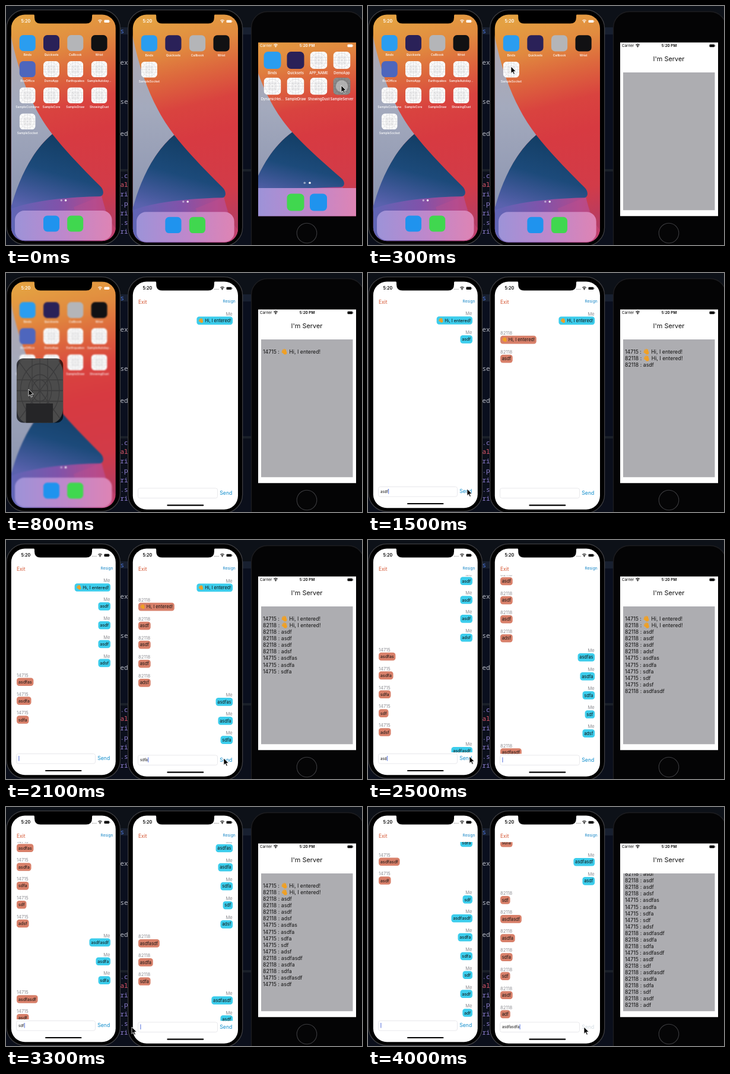
These frames come from a looping animation (600 px wide and 403 px high, 4.1 s). An HTML page:

```html
<!DOCTYPE html>
<html lang="en">
<head>
<meta charset="utf-8">
<title>Socket chat demo</title>
<style>
  html, body { margin: 0; width: 600px; height: 403px; overflow: hidden; background: #0a0f1e; }
  svg { display: block; }
  text { font-family: Inter, "Open Sans", sans-serif; white-space: pre; }
  .code { font-family: "Noto Sans Mono", "DejaVu Sans Mono", monospace; }
</style>
</head>
<body>
<svg id="stage" width="600" height="403" viewBox="0 0 600 403">
  <defs>
    <linearGradient id="sky" x1=".4" y1="0" x2=".52" y2="1">
      <stop offset="0" stop-color="#e4a142"/><stop offset=".15" stop-color="#e18a3f"/>
      <stop offset=".27" stop-color="#dd683d"/><stop offset=".41" stop-color="#d9433f"/>
      <stop offset=".55" stop-color="#d73a41"/><stop offset=".8" stop-color="#d23b48"/><stop offset="1" stop-color="#b03c68"/>
    </linearGradient>
    <linearGradient id="mist" x1="0" y1="0" x2="0" y2="1">
      <stop offset="0" stop-color="#b0a9b0"/><stop offset=".4" stop-color="#a4aabd"/><stop offset="1" stop-color="#8b94b0"/>
    </linearGradient>
    <linearGradient id="sea" x1=".6" y1="0" x2=".25" y2="1">
      <stop offset="0" stop-color="#123c62"/><stop offset=".5" stop-color="#1c4a7a"/><stop offset="1" stop-color="#5a62ae"/>
    </linearGradient>
    <linearGradient id="dusk">
      <stop offset="0" stop-color="#5f66b6"/><stop offset=".45" stop-color="#8053aa"/><stop offset=".8" stop-color="#b04a8c"/><stop offset="1" stop-color="#c43f68"/>
    </linearGradient>
    <linearGradient id="dock">
      <stop offset="0" stop-color="#9d93d8"/><stop offset=".5" stop-color="#bd88cc"/><stop offset="1" stop-color="#de84b4"/>
    </linearGradient>
    <g id="wall">
      <rect x="-1" width="178" height="384" fill="url(#sky)"/>
      <path d="M-1 34C14 110 40 165 69 202C33 232 10 284 -1 334Z" fill="url(#mist)"/>
      <path d="M-1 322C40 312 100 308 152 305C158 330 165 350 177 362V384H-1Z" fill="url(#dusk)"/>
      <path d="M105 325L152 306 172 382H122Z" fill="#c2508e" opacity=".3"/>
      <path d="M69 202C95 235 125 265 150 290C157 297 156 306 150 307C100 308 40 313 -1 328C10 284 33 232 69 202Z" fill="url(#sea)"/>
    </g>
    <symbol id="grid" viewBox="0 0 30 30" preserveAspectRatio="none">
      <rect width="30" height="30" rx="7" fill="#fbfbfb"/>
      <g fill="none" stroke="#c6c6c9" stroke-width=".45">
        <path d="M2 2L28 28M28 2L2 28M0 15H30M15 0V30M10 0V30M20 0V30M0 10H30M0 20H30"/>
        <circle cx="15" cy="15" r="5"/><circle cx="15" cy="15" r="7.5"/><circle cx="15" cy="15" r="12.5"/>
      </g>
    </symbol>
    <symbol id="hand" viewBox="0 0 10 10">
      <path d="M4.4 6.4L2 3.6M5 5.4L3.2 2M6.2 5L5 1.4M7.3 5L6.8 2.1M4 7L1.5 5.5" stroke="#f0a024" stroke-width="1.4" stroke-linecap="round"/>
      <circle cx="6.1" cy="6.6" r="2.6" fill="#f0a024"/>
    </symbol>
    <clipPath id="screen"><rect x="8.8" y="14.4" width="176" height="381.8" rx="23"/></clipPath>
    <clipPath id="list"><rect x="8" y="59" width="178" height="299"/></clipPath>
    <clipPath id="small"><rect x="425" y="61.6" width="165" height="292.6"/></clipPath>
    <clipPath id="log"><rect x="430" y="112" width="155" height="232"/></clipPath>
  </defs>
</svg>
<script>
const LOOP = 4100, STEP = 100;
const A = '14715', B = '82118', HI = 'Hi, I entered!';

// [time, sender, text]
const chat = [
  [720, A, HI], [1090, B, HI], [1490, B, 'asdf'], [1590, B, 'asdf'], [1690, B, 'asdf'], [1790, B, 'adsf'],
  [1940, A, 'asdfas'], [2020, A, 'asdfa'], [2100, A, 'sdfa'], [2180, A, 'sdf'], [2260, A, 'adsf'],
  [2405, B, 'asdfasdf'], [2540, B, 'asdfa'], [2700, B, 'sdfa'], [3000, A, 'asdfasdf'], [3205, A, 'asdf'],
  [3330, B, 'sdf'], [3420, B, 'asdfasdf'], [3490, B, 'asdfa'], [3560, B, 'sdfa'], [3640, B, 'sdf'],
  [3710, B, 'asdf'], [3790, B, 'adf'], [4010, A, 'asdfasdfa']
].map(([at, who, text]) => ({ at, who, text }));

// pointer tip: [time, x, y]
const path = [
  [0, 565, 134], [150, 565, 134], [300, 241, 102], [500, 241, 102], [720, 38, 196], [900, 38, 196],
  [1150, 60, 368], [1280, 60, 368], [1480, 167, 364], [1800, 168, 364], [1930, 366, 368],
  [2280, 368, 368], [2400, 171, 365], [2700, 171, 365], [2950, 372, 368], [3200, 372, 368],
  [3300, 212, 371], [3350, 170, 365], [3790, 170, 365], [3900, 290, 371], [4000, 364, 371], [4100, 364, 371]
];

const clamp = x => Math.max(0, Math.min(1, x));
const mix = (a, b, k) => a + (b - a) * k;
const smooth = x => x * x * (3 - 2 * x);
const easeOut = x => 1 - (1 - x) ** 2;

function set(node, attrs) {
  for (const k in attrs) node.setAttribute(k, attrs[k]);
  return node;
}
function el(parent, tag, attrs) {
  return parent.appendChild(set(document.createElementNS('http://www.w3.org/2000/svg', tag), attrs || {}));
}
const box = (p, x, y, width, height, rx, fill, more) => el(p, 'rect', { x, y, width, height, rx, fill, ...more });
// y is the middle of the line
function label(p, str, x, y, size, fill, more) {
  const node = el(p, 'text', { x, y: y + size * .36, 'font-size': size, fill, ...more });
  node.textContent = str;
  return node;
}
const END = { 'text-anchor': 'end' }, MID = { 'text-anchor': 'middle' };
const show = (node, on) => set(node, { visibility: on ? 'inherit' : 'hidden' });

function tile(p, cx, cy, s, color) {
  const x = cx - s / 2, y = cy - s / 2;
  return color ? box(p, x, y, s, s, s * .24, color)
    : el(p, 'use', { href: '#grid', x, y, width: s, height: s });
}

const COLORS = { Binds: '#2a9df0', Quicksets: '#2a2158', Callbook: '#b4b5b8', Wrist: '#111113', BoxOffice: '#4e66bd' };
const STOCK = ['Binds', 'Quicksets', 'Callbook', 'Wrist'];

function icons(p, names, x0, y0, dx, dy, s, size) {
  return names.map((name, i) => {
    const cx = x0 + i % 4 * dx, cy = y0 + Math.floor(i / 4) * dy;
    label(p, name, cx, cy + s * .73, size, '#fff', { ...MID, 'font-weight': 500 });
    return tile(p, cx, cy, s, COLORS[name]);
  });
}

function wifi(p, x, y) {
  el(p, 'path', { d: `M${x - 3.2} ${y - 1.2}Q${x} ${y - 4} ${x + 3.2} ${y - 1.2}M${x - 1.9} ${y + .3}Q${x} ${y - 1.4} ${x + 1.9} ${y + .3}`,
    fill: 'none', stroke: 'currentColor', 'stroke-width': 1.1 });
  el(p, 'circle', { cx: x, cy: y + 1.6, r: 1, fill: 'currentColor' });
}
function battery(p, x, y) {
  box(p, x, y - 2.2, 8.6, 4.4, 1.2, 'currentColor');
  box(p, x + 9.1, y - .8, .8, 1.6, .4, 'currentColor');
}

// Window that grows out of a pressed icon until it fills the screen
function launcher(p, icon, from, to, start) {
  const g = el(p, 'g');
  const art = el(g, 'use', { href: '#grid' });
  const dim = box(g, 0, 0, 0, 0, 0, '#000');
  const block = box(g, 0, 0, 0, 0, 0, '#252527');
  const white = box(g, 0, 0, 0, 0, 0, '#fff');
  const touch = el(g, 'circle', { cx: from.x, cy: from.y, r: 10, fill: '#d8d8d8', opacity: .55 });
  return t => {
    const k = smooth(clamp((t - start) / 290)), active = t > start - STEP && k < 1;
    show(g, active);
    show(icon, !active && k < 1);
    show(touch, active && k === 0);
    const w = mix(from.s, to.w, k), h = mix(from.s, to.h, k ** 1.39);
    const x = mix(from.x, to.x + to.w / 2, k) - w / 2, y = mix(from.y, to.y + to.h / 2, k) - h / 2;
    const area = { x, y, width: w, height: h, rx: mix(6.5, 20, k) };
    set(art, area);
    set(dim, { ...area, opacity: .45 + .25 * clamp(k * 3) });
    set(block, { x: x + w * .2, y: y + h * .7, width: w * .58, height: h * .3, opacity: clamp(k * 5) });
    set(white, { ...area, opacity: clamp((k - .4) * 2.4) });
    return k;
  };
}

// Space scrolled so that the newest row rests on the limit
function scrollAt(rows, t, base, pitch, limit) {
  return rows.reduce((sum, m, i) =>
    sum + Math.min(pitch, Math.max(0, base + pitch * i - limit)) * easeOut(clamp((t - m.at) / 200)), 0);
}

function fieldText(user, t) {
  const own = chat.filter(m => m.who === user);
  const i = own.findIndex((m, n) => n > 0 && t < m.at + 50);
  if (i < 0) return '';
  const m = own[i], from = Math.max(own[i - 1].at + 50, m.at - 200);
  return m.text.slice(0, Math.ceil(m.text.length * clamp((t - from) / (m.at - from))));
}

function bubble(p, m, mine) {
  const g = el(p, 'g'), hi = m.text === HI, pad = hi ? 11 : 0;
  label(g, mine ? 'Me' : m.who, mine ? 175.5 : 18, -11.3, 7.5, '#8e8e93', mine ? END : {});
  const back = box(g, 0, -6.8, 0, 13.6, 4.2, mine ? '#3ccdec' : '#d8806a');
  const text = label(g, m.text, 0, 0, 7.3, '#111');
  const w = text.getComputedTextLength() + pad + 5.4, x = mine ? 176 - w : 18;
  set(back, { x, width: w });
  set(text, { x: x + 2.7 + pad });
  if (hi) el(g, 'use', { href: '#hand', x: x + 2.5, y: -5, width: 9.5, height: 9.5 });
  return g;
}

function tallPhone(p, user, names, openAt, focusAt, transform) {
  const g = el(p, 'g', { transform });
  box(g, .8, 6.6, 191.6, 395.4, 31, '#000', { stroke: '#3d3d40', 'stroke-width': 1.3 });
  const screen = el(g, 'g', { 'clip-path': 'url(#screen)' });

  const home = el(screen, 'g');
  el(home, 'use', { href: '#wall', transform: 'translate(9 14)' });
  const apps = icons(home, names, 36.2, 62.5, 40.3, 44.1, 27, 5.1);
  el(home, 'circle', { cx: 93.3, cy: 327.7, r: 1.7, fill: '#fff', opacity: .5 });
  el(home, 'circle', { cx: 100.6, cy: 327.7, r: 1.7, fill: '#fff' });
  box(home, 15, 345, 163.5, 50, 16, 'url(#dock)');
  tile(home, 76.5, 367, 27, '#1f93ee');
  tile(home, 116.7, 367, 27, '#40d74f');
  const n = names.length - 1;
  const open = launcher(screen, apps[n], { x: 36.2 + n % 4 * 40.3, y: 62.5 + Math.floor(n / 4) * 44.1, s: 27 },
    { x: 9, y: 14, w: 175, h: 382 }, openAt);

  const app = el(screen, 'g');
  box(app, 8, 14, 178, 383, 0, '#fff');
  label(app, 'Exit', 18, 49, 8.4, '#d4532f');
  label(app, 'Resign', 180.5, 47.7, 6.6, '#1485c6', END);
  const list = el(app, 'g', { 'clip-path': 'url(#list)' });
  const rows = chat.filter(m => user === A || m !== chat[0]).slice(0, -1);
  const views = rows.map(m => bubble(list, m, m.who === user));
  box(app, 17.5, 360.5, 133, 16.5, 3, '#fff', { stroke: '#e3e3e7', 'stroke-width': .8 });
  const field = label(app, '', 21, 368.4, 6.2, '#111');
  const caret = box(app, 21, 364, .9, 8.5, 0, '#3f5fd8');
  const send = label(app, 'Send', 154.3, 368.3, 8.6, '#0d8ccc');
  box(app, 66, 388, 61.5, 2.1, 1, '#000');

  el(g, 'path', { d: 'M44 13H149q-4 0-4 4v2.4q0 10-10 10H58q-10 0-10-10v-2.4q0-4-4-4Z', fill: '#000' });
  const status = el(g, 'g');
  label(status, '5:20', 25.4, 25.8, 7.1, 'currentColor', { 'font-weight': 600 });
  wifi(status, 158.5, 25.8);
  battery(status, 165.5, 25.8);
  const signal = el(status, 'g');
  for (let i = 0; i < 4; i++) el(signal, 'circle', { cx: 145.5 + i * 2.2, cy: 27.3, r: .6, fill: '#777' });

  return t => {
    const k = open(t);
    home.style.filter = k > 0 && k < 1 ? `blur(${Math.min(1, k * 3)}px)` : '';
    show(home, k < 1);
    show(app, k === 1);
    show(signal, k === 1);
    set(status, { color: k > .8 ? '#000' : '#fff' });
    const shift = scrollAt(rows, t, 80, 31.85, 347);
    views.forEach((v, i) => {
      show(v, t >= rows[i].at);
      set(v, { transform: `translate(0 ${80 + 31.85 * i - shift})` });
    });
    field.textContent = fieldText(user, t);
    set(caret, { x: 21.4 + field.getComputedTextLength() });
    show(caret, t >= focusAt);
    set(send, { fill: user === A && t >= 4000 ? '#d3dce2' : '#0d8ccc' });
  };
}

function serverPhone(p) {
  box(p, 413.5, 9.5, 190, 420, 27, '#040405', { stroke: '#1d1d20', 'stroke-width': 1.4 });
  el(p, 'circle', { cx: 507, cy: 383, r: 16.8, fill: '#050506', stroke: '#3c3c3f', 'stroke-width': 1.1 });
  const screen = el(p, 'g', { 'clip-path': 'url(#small)' });

  const home = el(screen, 'g');
  el(home, 'use', { href: '#wall', transform: 'translate(412 35) scale(1.02 .88)' });
  const names = ['Binds', 'Quicksets', 'APP_NAME', 'DemoApp', 'DynamicHei...', 'SampleDraw', 'ShowingDust', 'SampleServer'];
  const apps = icons(home, names, 449, 91.5, 39, 43.8, 29, 5.8);
  el(home, 'circle', { cx: 503.3, cy: 298.2, r: 1.8, fill: '#fff', opacity: .5 });
  el(home, 'circle', { cx: 512, cy: 298.2, r: 1.8, fill: '#fff' });
  box(home, 425, 307, 165, 48, 0, 'url(#dock)');
  tile(home, 488, 331, 29, '#40d74f');
  tile(home, 526.5, 331, 29, '#1f93ee');
  const open = launcher(screen, apps[7], { x: 566, y: 135.3, s: 29 }, { x: 425, y: 61, w: 165, h: 293 }, 0);

  const app = el(screen, 'g');
  box(app, 425, 61, 165, 294, 0, '#fff');
  label(app, "I'm Server", 507, 89, 10.9, '#111', MID);
  box(app, 430, 112, 154.5, 232.3, 0, '#adadb1');
  const log = el(el(app, 'g', { 'clip-path': 'url(#log)' }), 'g');
  const rows = chat.slice(0, -1);
  const lines = rows.map((m, i) => {
    const g = el(log, 'g'), y = 133 + 11.05 * i, hi = m.text === HI;
    const head = label(g, m.who + ' : ' + (hi ? '' : m.text), 433, y, 8.75, '#111');
    if (hi) {
      const x = 433 + head.getComputedTextLength();
      el(g, 'use', { href: '#hand', x, y: y - 6, width: 11.5, height: 11.5 });
      label(g, HI, x + 14, y, 8.75, '#111');
    }
    return g;
  });

  const status = el(p, 'g');
  label(status, 'Carrier', 428, 67, 6.2, 'currentColor');
  wifi(status, 454.5, 67);
  label(status, '5:20 PM', 507.5, 67, 6.3, 'currentColor', { ...MID, 'font-weight': 600 });
  battery(status, 575.5, 67);

  return t => {
    const k = open(t);
    home.style.filter = k > 0 && k < 1 ? `blur(${Math.min(1, k * 3)}px)` : '';
    show(home, k < 1);
    show(app, k === 1);
    set(status, { color: k > .8 ? '#000' : '#fff' });
    lines.forEach((g, i) => show(g, t >= rows[i].at));
    set(log, { transform: `translate(0 ${-scrollAt(rows, t, 133, 11.05, 334.1)})` });
  };
}

function editor(p) {
  box(p, 0, 0, 600, 403, 0, '#0a0f1e');
  box(p, 0, 0, 600, 36, 0, '#0d1118');
  box(p, 0, 36, 600, 12, 0, '#182030');
  box(p, 0, 275, 600, 4, 0, '#1a2029');
  box(p, 0, 279, 600, 124, 0, '#0b0f1b');
  const code = [['s', 42, '#4a74d8'], ['ex', 95, '#b8bbc4'], ['se', 161, '#b8bbc4'], ['ed', 215, '#b8bbc4'],
    ['.c', 286, '#8f7fd0'], ['al', 301, '#e0586a'], ['ri', 317, '#8f7fd0'], ['.p', 333, '#8f7fd0'],
    ['ri', 349, '#8f7fd0'], ['.s', 365, '#8f7fd0'], ['ri', 380, '#8f7fd0']];
  for (const [str, y, fill] of code) label(p, str, 192.5, y, 11, fill, { class: 'code' });
}

const stage = document.getElementById('stage');
editor(stage);
const parts = [
  tallPhone(stage, B, [...STOCK, 'BoxOffice', 'DemoApp', 'Earthquakes', 'SampleAutolay...', 'SampleCombine',
    'SampleCore', 'SampleDraw', 'ShowingDust', 'SampleSocket'], 685, 1250, ''),
  tallPhone(stage, A, [...STOCK, 'SampleSocket'], 400, 1900, 'translate(204.9 -.1) scale(1.007)'),
  serverPhone(stage)
];
const pointer = el(stage, 'path', { d: 'M0 0V11.5L2.7 9 4.5 13.2 6.4 12.4 4.6 8.3H8.2Z', fill: '#000', stroke: '#fff', 'stroke-width': .8 });

function draw(t) {
  parts.forEach(part => part(t));
  const i = path.findIndex(s => s[0] > t), [t0, x0, y0] = path[i - 1], [t1, x1, y1] = path[i];
  const k = smooth((t - t0) / (t1 - t0));
  set(pointer, { transform: `translate(${mix(x0, x1, k)} ${mix(y0, y1, k)})` });
}

const start = performance.now();
function tick() {
  const t = (performance.now() - start) % LOOP;
  draw(Math.floor(t / STEP) * STEP);
  requestAnimationFrame(tick);
}
tick();
</script>
</body>
</html>
```
